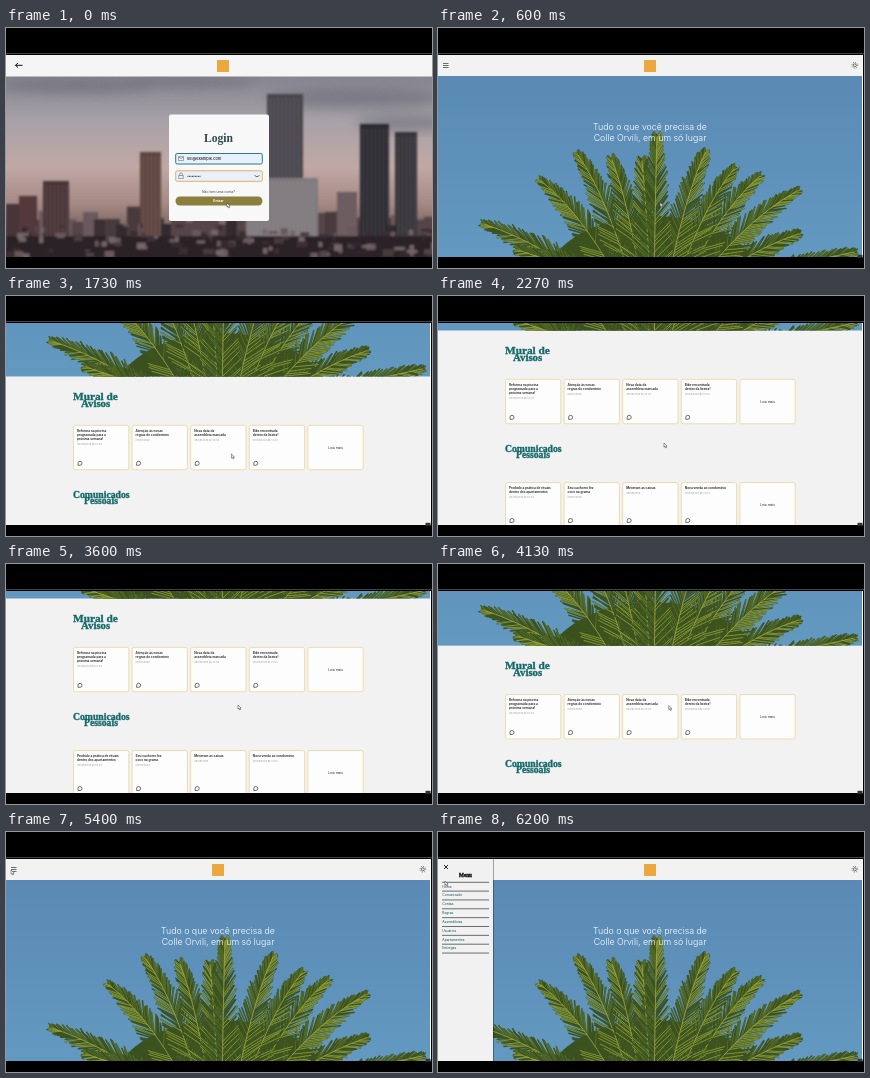
These frames come from a looping animation (426 by 240 pixels, 6270 ms). An HTML page:

```html
<!DOCTYPE html>
<html lang="pt">
<head>
<meta charset="utf-8">
<title>Portal do condomínio</title>
<style>
  html, body { margin: 0; width: 100%; height: 100%; overflow: hidden; background: #000; }
  svg { display: block; width: 100vw; height: 100vh; }
  text { font-family: Inter, "Open Sans", sans-serif; }
  .display { font-family: "Liberation Serif", "Noto Serif", serif; font-weight: 700; fill: #17696a; stroke: #17696a; stroke-width: .35; }
  .mid { text-anchor: middle; }
  .line { fill: none; stroke: #333; stroke-width: .7; }
  .thin { fill: none; stroke: #555; stroke-width: .5; }
  .bold { font-weight: 700; }
</style>
</head>
<body>
<svg viewBox="0 0 426 240">
  <defs>
    <clipPath id="view"><rect y="27" width="426" height="202"/></clipPath>
    <clipPath id="heroClip"><rect y="48" width="424" height="183.500"/></clipPath>
    <linearGradient id="dusk" x2="0" y2="1">
      <stop offset="0" stop-color="#85858f"/>
      <stop offset=".25" stop-color="#a8a2a8"/>
      <stop offset=".5" stop-color="#c0a8a4"/>
      <stop offset=".7" stop-color="#a58984"/>
      <stop offset="1" stop-color="#4a3a3c"/>
    </linearGradient>
    <linearGradient id="sky" x2="0" y2="1">
      <stop offset="0" stop-color="#5a8ab4"/>
      <stop offset="1" stop-color="#6399c0"/>
    </linearGradient>
    <filter id="soft"><feGaussianBlur stdDeviation="1"/></filter>
    <filter id="cloudy"><feGaussianBlur stdDeviation="6"/></filter>
  </defs>

  <rect width="426" height="240"/>
  <g clip-path="url(#view)">
    <g id="login">
      <rect y="48" width="426" height="182" fill="url(#dusk)"/>
      <g id="clouds" fill="#6a6b76" opacity=".6" filter="url(#cloudy)"></g>
      <g id="city" filter="url(#soft)"></g>
      <rect y="27" width="426" height="21.500" fill="#f5f5f5"/>
      <path d="M16.500 37.300H9.500M12 35l-2.500 2.300l2.500 2.300" class="line" style="stroke:#111;stroke-width:1"/>
      <rect x="211" y="32" width="12" height="12" fill="#eba83f"/>
      <rect x="163" y="86.500" width="100" height="106.500" rx="2" fill="#f8f8f8"/>
      <text x="212.500" y="114" class="display mid" font-size="11.600" style="fill:#2c4a4a;stroke:none">Login</text>
      <rect x="169.700" y="125.500" width="86.600" height="10.500" rx="1.500" fill="#e7f0fb" stroke="#2a7a84"/>
      <path d="M172.500 128.700h5v3.800h-5zl2.500 2l2.500-2" class="thin"/>
      <text x="181" y="132" font-size="3.900" font-weight="500" fill="#222">sol@example.com</text>
      <rect x="169.700" y="142.800" width="86.600" height="10.500" rx="1.500" fill="#e7f0fb" stroke="#e5b060"/>
      <path d="M172.700 147.500h4.600v3h-4.600zM173.700 147.500v-1.500a1.300 1.300 0 0 1 2.600 0v1.500" class="thin"/>
      <path d="M181.500 148.300h13" stroke="#333" stroke-width="1" stroke-dasharray="1 .5"/>
      <path d="M248.500 147.500q2.500 2.500 5 0" class="line"/>
      <text x="212.500" y="165" class="mid" font-size="3.400" fill="#444">Não tem uma conta?</text>
      <rect x="169.500" y="168.500" width="87" height="9" rx="4.500" fill="#8c7e3c"/>
      <text x="212.500" y="174.200" class="mid bold" font-size="3.500" fill="#fff">Entrar</text>
    </g>

    <g id="home">
      <rect width="425" height="240" fill="#fafafa"/>
      <g id="page">
        <rect y="27" width="424" height="440" fill="#f2f2f2"/>
        <rect y="48" width="424" height="183.500" fill="url(#sky)"/>
        <g clip-path="url(#heroClip)">
          <g id="palm" fill="none" stroke-linecap="round">
            <ellipse cx="215" cy="262" rx="112" ry="74" fill="#3a501f"/>
          </g>
        </g>
        <g class="mid" font-size="8.800" font-weight="300" fill="#fff">
          <text x="212" y="102.200">Tudo o que você precisa de</text>
          <text x="212" y="112.600">Colle Orvili, em um só lugar</text>
        </g>
        <rect x="206" y="32" width="12" height="12" fill="#eba83f"/>
        <path d="M5 35.500h5.500M5 37.500h5.500M5 39.500h5.500" class="line"/>
        <circle cx="416.800" cy="37.300" r="1.500" class="line"/>
        <circle cx="416.800" cy="37.300" r="2.900" class="line" stroke-dasharray=".9 1.380"/>
        <g id="board" transform="translate(0 197)">
          <text x="67" y="58" class="display" font-size="11.300">Mural de</text>
          <text x="75" y="65" class="display" font-size="10.800">Avisos</text>
          <text x="67" y="156" class="display" font-size="9.700">Comunicados</text>
          <text x="78" y="161.800" class="display" font-size="9.700">Pessoais</text>
        </g>
      </g>
      <g id="menu">
        <rect x="55" y="27" width="1" height="203" fill="#0005"/>
        <rect y="27" width="55" height="203" fill="#f1f1f1"/>
        <path d="M6 33l4 4M10 33l-4 4" class="line" style="stroke:#111;stroke-width:.9"/>
        <text x="27.500" y="44.500" class="display mid" font-size="5.200" style="fill:#111;stroke:#111">Menu</text>
        <path d="M4 50.300H51" class="line"/>
      </g>
    </g>
    <path id="cursor" d="M0 0v4.200l1-.9l.8 1.700l.8-.4l-.8-1.600h1.300z" fill="#fff" stroke="#333" stroke-width=".5"/>
  </g>
  <path d="M0 25.500H426" stroke="#444"/>
  <path id="corner" d="M419.500 228.300h5" stroke="#333" stroke-width="3"/>
</svg>
<script>
const LOOP = 6270;
const $ = id => document.getElementById(id);

function add(parent, tag, attrs, text = '') {
  const el = document.createElementNS('http://www.w3.org/2000/svg', tag);
  for (const key in attrs) el.setAttribute(key, attrs[key]);
  el.textContent = text;
  return parent.appendChild(el);
}

let seed = 7;
const random = () => (seed = seed * 16807 % 2147483647) / 2147483647;

function drawCity() {
  const city = $('city');
  const block = (x, y, width, fill, height = 230 - y) => add(city, 'rect', { x, y, width, height, fill });
  for (const [cx, cy, rx, ry] of [[70, 58, 80, 7], [350, 70, 90, 10], [180, 54, 70, 5], [400, 95, 50, 8]])
    add($('clouds'), 'ellipse', { cx, cy, rx, ry });

  // Low roofs behind the towers
  const tones = ['#3c2f32', '#55454a', '#483a3d', '#6a595c', '#32292d'];
  for (let x = 0; x < 426; x += 11) block(x, 176 + random() * 22, 15, tones[random() * 5 | 0]);

  // Towers: left, top, width, colour
  const towers = [
    [0, 176, 13, '#463438'], [13, 168, 18, '#54393a'], [37, 153, 26, '#4a3437'],
    [134, 124, 21, '#5d4541'], [261, 66, 36, '#4a464d'], [240, 150, 72, '#807a7e'],
    [331, 164, 20, '#6d5c61'], [354, 96, 29, '#2c2a30'], [389, 104, 22, '#36343a']
  ];
  for (const [x, y, w, fill] of towers) {
    block(x, y, w, fill);
    if (y < 160) for (let k = 3; k < w - 1; k += 4)
      block(x + k, y + 4, 1, '#d8ccca').setAttribute('opacity', .16);
  }
  block(0, 208, 426, '#2b2427');
  for (let i = 0; i < 110; i++)
    block(random() * 426, 196 + random() * 30, 3 + random() * 8, random() < .3 ? '#756568' : tones[random() * 5 | 0], 2 + random() * 5);
}

// A frond is a bent rib with leaflets slanting towards the tip
function drawFrond(tipX, tipY) {
  const bx = 215 + (tipX - 215) * .2, by = 276;
  const cx = bx + (tipX - bx) * .5, cy = by + (tipY - by) * .72;
  const dark = ['', ''], light = ['', ''];
  const n = 56;
  for (let i = 4; i <= n; i++) {
    const t = i / n, u = 1 - t;
    const x = u * u * bx + 2 * u * t * cx + t * t * tipX;
    const y = u * u * by + 2 * u * t * cy + t * t * tipY;
    const dir = Math.atan2(u * (cy - by) + t * (tipY - cy), u * (cx - bx) + t * (tipX - cx));
    const len = 3 + 28 * Math.pow(u, .45) * (.75 + .25 * random());
    [-1, 1].forEach((side, k) => {
      const a = dir + side * (.3 + .4 * u + .15 * random());
      const blade = `M${x} ${y}l${len * Math.cos(a)} ${len * Math.sin(a) + 3 * u}`;
      dark[k] += blade;
      if (random() < .55) light[k] += blade;
    });
  }
  const tones = ['#8b9a35', '#587028'];
  if (tipX > 215) tones.reverse();
  const stroke = (d, color, width) => add($('palm'), 'path', { d, stroke: color, 'stroke-width': width });
  stroke(dark.join(''), '#3c531f', 1.5);
  light.forEach((d, k) => stroke(d, tones[k], .9));
  stroke(`M${bx} ${by}Q${cx} ${cy} ${tipX} ${tipY}`, '#a3a848', .8);
}

function drawCard(x, y, lines, date) {
  const board = $('board');
  add(board, 'rect', { x, y, width: 55.300, height: 44.500, rx: 2, fill: '#fdfdfd', stroke: '#ecd9a4', 'stroke-width': .9 });
  if (!lines) {
    add(board, 'text', { x: x + 27.700, y: y + 23.500, class: 'mid', 'font-size': 3.400, fill: '#333' }, 'Leia mais');
    return;
  }
  lines.forEach((s, i) => add(board, 'text', { x: x + 3.500, y: y + 6.700 + i * 4, class: 'bold', 'font-size': 3.150, fill: '#333' }, s));
  add(board, 'text', { x: x + 3.500, y: y + 7.700 + lines.length * 4, 'font-size': 2.500, fill: '#999' }, date);
  add(board, 'path', { d: `M${x + 4.500} ${y + 40}v-2a2 2 0 1 1 2 2z`, class: 'line' });
}

function drawBoard() {
  const stamp = '09/09/2022 às 14:04', day = '09/09/2022';
  const rows = [
    [83.300, [['Reforma na piscina', 'programada para a', 'próxima semana!'], stamp],
      [['Atenção às novas', 'regras do condomínio'], day],
      [['Nova data da', 'assembleia marcada'], stamp],
      [['Bike encontrada', 'dentro da lixeira!'], stamp], []],
    [186.500, [['Proibido a prática de rituais', 'dentro dos apartamentos'], stamp],
      [['Seu cachorro fez', 'coco na grama'], day],
      [['Mexeram as caixas'], day],
      [['Nova venda ao condomínio'], stamp], []]
  ];
  for (const [y, ...cards] of rows)
    cards.forEach(([lines, date], i) => drawCard(67.500 + i * 58.600, y, lines, date));
}

function drawMenu() {
  const items = ['Home', 'Comunicado', 'Contas', 'Regras', 'Assembleias', 'Usuários', 'Apartamentos', 'Entregas'];
  items.forEach((name, i) => {
    const y = 55.500 + i * 8.850;
    add($('menu'), 'text', { x: 4.300, y, 'font-size': 3.300, 'font-weight': 500, fill: '#286b6b' }, name);
    add($('menu'), 'path', { d: `M4 ${y + 3.600}H51`, class: 'line' });
  });
}

const ease = (t, from, to) => {
  const p = Math.min(1, Math.max(0, (t - from) / (to - from)));
  return p * p * (3 - 2 * p);
};

// Pointer stops: time, x, y
const stops = [
  [0, 221, 175], [500, 222, 175], [1330, 225, 165], [2270, 226, 147], [3000, 228, 146],
  [3600, 232, 141], [4530, 230, 142], [4750, 228, 140], [5350, 5, 38], [5750, 6, 39], [6150, 7, 49], [LOOP, 7, 49]
];

function pointer(t) {
  const i = stops.findIndex(s => s[0] > t);
  const [t0, x0, y0] = stops[i - 1], [t1, x1, y1] = stops[i];
  const p = ease(t, t0, t1);
  return [x0 + (x1 - x0) * p, y0 + (y1 - y0) * p];
}

function render(now) {
  const t = now % LOOP, home = t >= 470;
  const scroll = 197 * (ease(t, 1000, 2065) - ease(t, 3800, 4840));
  $('login').style.display = home ? 'none' : '';
  $('home').style.display = $('corner').style.display = home ? '' : 'none';
  $('page').setAttribute('transform', `translate(0 ${-scroll})`);
  $('menu').setAttribute('transform', `translate(${-57 * (1 - ease(t, 5530, 5830))} 0)`);
  $('cursor').setAttribute('transform', `translate(${pointer(t)})`);
  requestAnimationFrame(render);
}

drawCity();
[[46, 196], [416, 224], [80, 222], [360, 206], [103, 153], [359, 163], [140, 127], [321, 149],
  [174, 132], [296, 141], [204, 133], [267, 125], [219, 109]].forEach(tip => drawFrond(...tip));
drawBoard();
drawMenu();
requestAnimationFrame(render);
</script>
</body>
</html>
```
